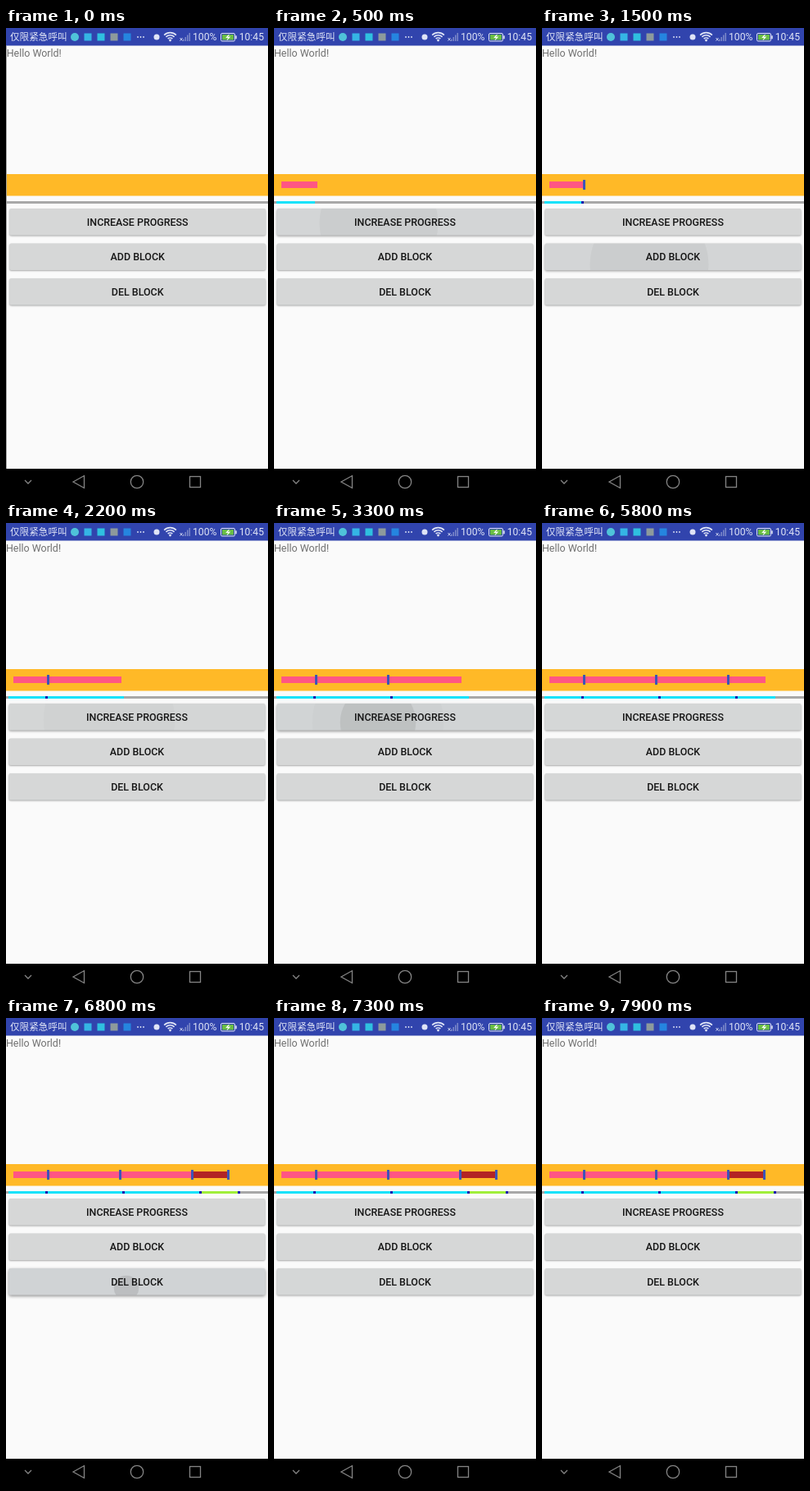
An HTML page with a canvas for the animation above (8 s loop, 320x569 px).

```html
<!DOCTYPE html>
<html lang="en">
<head>
<meta charset="utf-8">
<title>Block progress demo</title>
<style>
html, body { margin: 0; width: 100%; height: 100%; overflow: hidden; background: #fafafa; }
canvas { display: block; width: 320px; height: 569px; }
</style>
</head>
<body>
<canvas id="stage"></canvas>
<script>
const W = 320, H = 569, LOOP = 8000;
const canvas = document.getElementById('stage');
const ratio = window.devicePixelRatio || 1;
canvas.width = W * ratio;
canvas.height = H * ratio;
const ctx = canvas.getContext('2d');

const BUTTONS = {
  inc: { label: 'INCREASE PROGRESS', y: 220 },
  add: { label: 'ADD BLOCK', y: 262.5 },
  del: { label: 'DEL BLOCK', y: 305 }
};

const TAPS = [
  { t: 200, on: 'inc', x: 128, y: 238 },
  { t: 1200, on: 'add', x: 131, y: 288 },
  { t: 1600, on: 'inc', x: 126, y: 240 },
  { t: 1800, on: 'inc', x: 126, y: 240 },
  { t: 2400, on: 'add', x: 130, y: 284 },
  { t: 2900, on: 'inc', x: 127, y: 243 },
  { t: 3170, on: 'inc', x: 127, y: 243 },
  { t: 4100, on: 'add', x: 131, y: 284 },
  { t: 5300, on: 'inc', x: 128, y: 242 },
  { t: 6800, on: 'del', x: 147, y: 329 }
];

function rect(x, y, w, h, color) {
  ctx.fillStyle = color;
  ctx.fillRect(x, y, w, h);
}

function text(str, x, y, size, color, align = 'left', weight = 400) {
  ctx.font = `${weight} ${size}px Roboto, "Noto Sans CJK SC", "Noto Sans CJK", sans-serif`;
  ctx.textAlign = align;
  ctx.fillStyle = color;
  ctx.fillText(str, x, y);
}

function disc(x, y, r, color) {
  ctx.beginPath();
  ctx.arc(x, y, r, 0, 7);
  ctx.fillStyle = color;
  ctx.fill();
}

function line(points, color, width, close) {
  ctx.beginPath();
  points.forEach(([x, y]) => ctx.lineTo(x, y));
  if (close) ctx.closePath();
  ctx.strokeStyle = color;
  ctx.lineWidth = width;
  ctx.stroke();
}

function roundRect(x, y, w, h, r) {
  ctx.beginPath();
  ctx.roundRect(x, y, w, h, r);
}

function statusBar() {
  const ink = '#dfe4f6';
  rect(0, 0, W, 21.5, '#3144ad');
  text('仅限紧急呼叫', 5, 15.3, 11.6, ink);
  disc(84, 11, 5, '#4fc3d9');
  ['#35b5e5', '#2fc0e0', '#8d9a9c', '#2585e0'].forEach((c, i) => rect(95.5 + 16 * i, 6.5, 9, 9, c));
  [161, 164.5, 168].forEach(x => disc(x, 11, 0.9, ink));
  disc(184, 11, 3.5, ink);

  ctx.lineCap = 'butt';
  for (const r of [4, 7.2, 10.4]) {
    ctx.beginPath();
    ctx.arc(200.5, 16, r, -Math.PI * 0.75, -Math.PI * 0.25);
    ctx.strokeStyle = ink;
    ctx.lineWidth = 1.6;
    ctx.stroke();
  }
  disc(200.5, 15, 1.4, ink);

  for (let i = 0; i < 4; i++) rect(216 + 2.5 * i, 13.5 - 2.5 * i, 1.5, 2.5 + 2.5 * i, '#7c88c9');
  line([[212.5, 12], [215.5, 15.5]], ink, 0.9);
  line([[215.5, 12], [212.5, 15.5]], ink, 0.9);

  text('100%', 228, 15.3, 12.2, ink);
  roundRect(262.5, 6.5, 17, 9.5, 1.5);
  ctx.strokeStyle = ink;
  ctx.lineWidth = 1;
  ctx.stroke();
  rect(264, 8, 14, 6.5, '#69bd45');
  rect(280.3, 9.3, 1.5, 4, ink);
  line([[272.5, 8], [269.5, 11.4], [273, 11.2], [270, 14.5]], '#fff', 1.1);
  text('10:45', 315, 15.3, 12.2, ink, 'right');
}

function navBar() {
  const ink = '#858585';
  rect(0, 537, W, 32, '#000');
  line([[23, 551], [27, 555], [31, 551]], ink, 1.3);
  line([[82, 553], [95.5, 545.5], [95.5, 560.5]], ink, 1.3, true);
  ctx.beginPath();
  ctx.arc(160, 553, 7.7, 0, 7);
  ctx.stroke();
  ctx.strokeRect(224.5, 546.5, 13, 13);
}

function progressBars(t) {
  let count = 0, deleting = false;
  const marks = [];
  for (const tap of TAPS) {
    if (tap.t > t) break;
    if (tap.on === 'inc') count++;
    else marks.push(count);
    deleting = tap.on === 'del';
  }
  rect(0, 178, W, 26.5, '#ffb927');
  rect(0, 211, W, 3, '#a8a8a8');
  if (!count) return;

  const wide = n => 9 + 44 * n, thin = n => 3 + 47 * n;
  rect(9, 187, 44 * count, 8, '#ff5683');
  rect(3, 211, 47 * count, 3, '#12e2fa');
  if (deleting) {
    const from = marks[marks.length - 2];
    rect(wide(from), 187, wide(count) - wide(from), 8, '#b22424');
    rect(thin(from), 211, thin(count) - thin(from), 3, '#a0ee3a');
  }
  for (const n of marks) {
    rect(wide(n) - 3, 185, 3, 12, '#3c55b5');
    rect(thin(n) - 2, 211, 3, 3, '#1414ad');
  }
}

function button(id, t) {
  const { label, y } = BUTTONS[id];
  const active = TAPS.filter(p => p.on === id && t >= p.t && t < p.t + 700);
  const lift = Math.max(0, ...active.map(p => 1 - (t - p.t) / 600));

  ctx.save();
  ctx.shadowColor = `rgba(0,0,0,${0.32 + 0.1 * lift})`;
  ctx.shadowBlur = (2 + 2 * lift) * ratio;
  ctx.shadowOffsetY = (1 + 0.6 * lift) * ratio;
  roundRect(3.5, y, 313, 32.5, 2);
  ctx.fillStyle = '#d6d7d7';
  ctx.fill();
  ctx.restore();

  ctx.save();
  roundRect(3.5, y, 313, 32.5, 2);
  ctx.clip();
  rect(3, y, 314, 33, `rgba(150,175,190,${0.1 * lift})`);
  for (const p of active) {
    const age = t - p.t, a = Math.min(age, 490);
    const radius = 15 + 0.275 * a - 0.00028 * a * a;
    disc(p.x, p.y, radius, `rgba(0,0,0,${0.1 * Math.max(0, 1 - age / 500)})`);
  }
  ctx.restore();
  text(label, 160, y + 20.6, 12.44, '#161616', 'center', 500);
}

function draw(t) {
  ctx.setTransform(ratio, 0, 0, ratio, 0, 0);
  rect(0, 0, W, H, '#fafafa');
  const settling = t < 100;
  ctx.save();
  if (settling) ctx.translate(0.7, 0);
  text('Hello World!', 0, 35, 12.44, '#707070');
  progressBars(t);
  for (const id in BUTTONS) button(id, t);
  ctx.restore();
  if (settling) rect(0, 21.5, 0.8, 516, '#8c8c8c');
  statusBar();
  navBar();
}

const start = performance.now();
function tick() {
  draw((performance.now() - start) % LOOP);
  requestAnimationFrame(tick);
}
tick();
</script>
</body>
</html>
```
